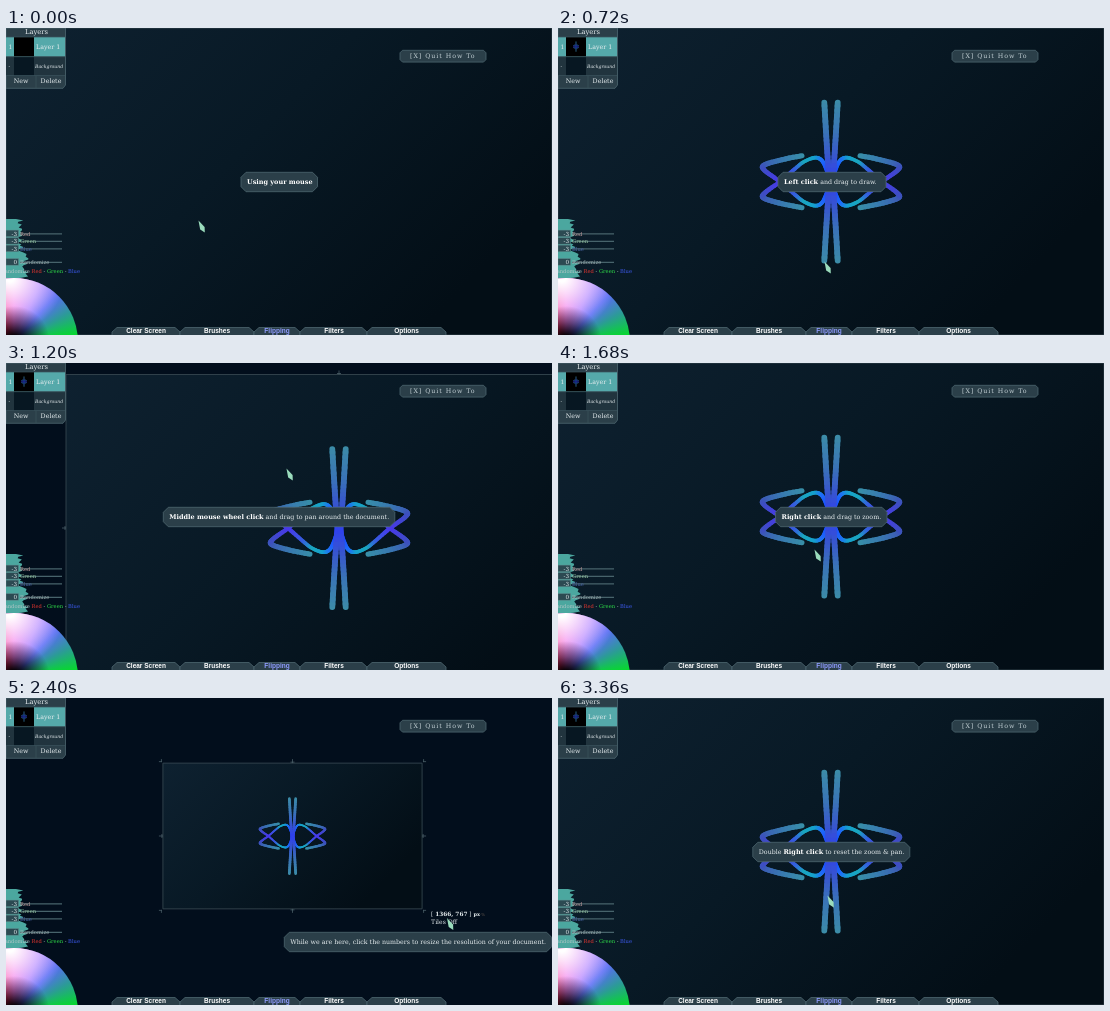
Recreate the animation shown at these times as an HTML page. Size 546 by 307 pixels, loop 3600 ms.

```html
<!DOCTYPE html>
<html lang="en">
<head>
<meta charset="utf-8">
<title>Using your mouse</title>
<style>
  html, body { margin: 0; width: 100%; height: 100%; overflow: hidden; background: #020e1b; }
  #stage { position: fixed; left: 0; top: 0; width: 546px; height: 307px; overflow: hidden; contain: strict; }
  svg { display: block; width: 546px; height: 307px; }
  text { font: 6.3px "DejaVu Serif", serif; fill: #e6edef; white-space: pre; }
  .bold { font-weight: bold; font-size: 6.5px; fill: #fff; }
  .tab { font: bold 6.5px "Liberation Sans", Arial, sans-serif; fill: #fff; }
  .mid { text-anchor: middle; }
  .box { fill: #2b3f49; stroke: #4d666f; stroke-width: .8; }
  .wheel {
    position: absolute; left: 0; top: 250px; width: 72px; height: 57px;
    clip-path: circle(64px at 8px 64px);
    background:
      radial-gradient(circle at 8px 64px, #000 6px, rgba(0,0,0,.5) 20px, rgba(0,0,0,0) 36px),
      radial-gradient(circle at 4px 0, #fff 4px, rgba(255,255,255,.6) 24px, rgba(255,255,255,0) 54px),
      conic-gradient(from 0deg at 8px 64px, #f060e8, #a870ff 24deg, #5a6cf5 42deg, #2c9a98 62deg, #06d92c 84deg, #06d92c 180deg, #ff1030 270deg, #ff2a70 335deg, #f060e8);
  }
</style>
</head>
<body>
<div id="stage">
<svg viewBox="0 0 546 307">
  <defs>
    <linearGradient id="paper" x1="0" y1="0" x2="1" y2=".55">
      <stop offset="0" stop-color="#0e2130"/>
      <stop offset=".5" stop-color="#081925"/>
      <stop offset="1" stop-color="#030e16"/>
    </linearGradient>
    <g id="loopStart"></g>
    <g id="loopEnd"></g>
    <g id="spine"></g>
  </defs>

  <rect width="546" height="307" fill="#020e1c"/>
  <g id="doc">
    <rect width="546" height="307" fill="url(#paper)"/>
    <g id="art" transform="translate(273 153.7)"></g>
  </g>
  <path id="frame" fill="none" stroke="#35464e" stroke-width=".9"/>
  <path id="marks" fill="none" stroke="#4b5f68" stroke-width=".8"/>
  <g id="info">
    <text x="9" y="7.2" style="font-size:5.8px">[ <tspan font-weight="bold">1366, 767</tspan> ] <tspan font-weight="bold" font-size="5">px</tspan><tspan font-size="4" fill="#66584f">·%</tspan></text>
    <text x="9" y="15" style="font-size:6.1px">Tiles Off</text>
  </g>

  <g id="layers">
    <path class="box" d="M0 0H59.5V57L57 60.3H0Z"/>
    <rect y="9" width="59" height="19.5" fill="#55a9aa"/>
    <rect y="29" width="59" height="18.5" fill="#21343e"/>
    <rect x="8" y="9" width="20" height="19.5" fill="#000"/>
    <rect x="8" y="29" width="20" height="18.5" fill="#071722"/>
    <path d="M0 9H59M0 28.7H59M0 47.5H59M30 48V60" stroke="#3b535d" stroke-width=".7"/>
    <g id="thumb" transform="translate(18 18.6) scale(.037 .062)" opacity=".6"></g>
    <text class="mid" x="30.5" y="6.4" style="font-size:6.8px">Layers</text>
    <text x="2.5" y="21" style="font-size:6px">1</text>
    <text x="30" y="21">Layer 1</text>
    <text x="2.5" y="40" style="font-size:5px">-</text>
    <text x="29" y="40" style="font-size:4.6px;font-style:italic">Background</text>
    <text class="mid" x="15" y="54.5">New</text>
    <text class="mid" x="45" y="54.5">Delete</text>
  </g>

  <path id="quit" class="box"/>
  <text x="404" y="30.4" letter-spacing=".95" style="fill:#c3d0d5">[X] Quit How To</text>

  <path id="rough" fill="#4ba79f"/>
  <g id="sliders"></g>
  <text x="74" y="245" text-anchor="end" style="font-size:5.2px;fill:#b3c6c6">Randomize <tspan fill="#e0352f">Red</tspan> - <tspan fill="#2fe04a">Green</tspan> - <tspan fill="#3f5cf5">Blue</tspan></text>

  <g id="tabs"></g>
  <g id="tip">
    <path class="box"/>
    <text></text>
    <text></text>
  </g>
  <path id="cursor" d="M-.5 -.5L5.6 6L5.8 11.5L1.2 8.4Z" fill="#9adcbc"/>
</svg>
<div class="wheel"></div>
</div>

<script>
const $ = id => document.getElementById(id);

function add(parent, tag, attrs, text = "") {
  const el = document.createElementNS("http://www.w3.org/2000/svg", tag);
  for (const key in attrs) el.setAttribute(key, attrs[key]);
  el.textContent = text;
  parent.append(el);
  return el;
}

function chamfer(x, y, w, h, c) {
  const r = x + w, b = y + h;
  return `M${x + c} ${y}H${r - c}L${r} ${y + c}V${b - c}L${r - c} ${b}H${x + c}L${x} ${b - c}V${y + c}Z`;
}

// Brush strokes: [x, y, width, red, green, blue], smoothed with Catmull-Rom.
const loop = [
  [-29, -26, 5, 56, 143, 168], [-49, -22, 5.2, 56, 122, 176], [-67, -16.5, 5.2, 60, 92, 182],
  [-66, -11, 4.8, 62, 76, 196], [-51, 0, 4.2, 72, 56, 236], [-36, 13, 3.8, 52, 96, 222],
  [-27, 20, 3.6, 26, 166, 190], [-16, 24, 3.8, 22, 160, 206], [-9, 21, 4, 30, 110, 248],
  [-4, 11, 4.4, 28, 78, 255], [-1, 0, 4.8, 34, 60, 255]
];
const spine = [
  [-6.7, -79, 5.8, 60, 140, 168], [-5, -50, 5.8, 58, 116, 182],
  [-3.4, -25, 5.8, 56, 86, 206], [-1.5, 0, 5.8, 46, 62, 242]
];

function sample(points, t) {
  const i = Math.min(Math.floor(t), points.length - 2), u = t - i;
  const at = k => points[Math.max(0, Math.min(points.length - 1, k))];
  const [p, a, b, n] = [at(i - 1), at(i), at(i + 1), at(i + 2)];
  return a.map((v, k) => k > 1 ? v + (b[k] - v) * u :
    v + .5 * u * (b[k] - p[k] + u * (2 * p[k] - 5 * v + 4 * b[k] - n[k] + u * (3 * (v - b[k]) + n[k] - p[k]))));
}

function brush(group, points, from, to) {
  const step = 1 / 6;
  for (let t = from; t < to - .01; t += step) {
    const [x, y, w, ...rgb] = sample(points, t), [x2, y2] = sample(points, t + step);
    add(group, "path", {
      d: `M${x} ${y}L${x2} ${y2}`, "stroke-width": w,
      stroke: `rgb(${rgb.map(Math.round)})`, "stroke-linecap": "round"
    });
  }
}

brush($("loopStart"), loop, 0, 4);
brush($("loopEnd"), loop, 4, 10);
brush($("spine"), spine, 0, 3);

function mirrored(parent) {
  return ["loopStart", "loopEnd", "spine"].map(id => {
    const group = add(parent, "g", {});
    for (const sx of [1, -1]) for (const sy of [1, -1])
      add(group, "use", { href: "#" + id, transform: `scale(${sx} ${sy})` });
    return group;
  });
}
const strokes = mirrored($("art"));
mirrored($("thumb"));

$("quit").setAttribute("d", chamfer(394, 22.3, 86, 11.8, 2.5));

// Ragged edge behind the colour sliders.
let seed = 7;
const random = () => (seed = seed * 16807 % 2147483647) / 2147483647;
let edge = "M0 191";
for (let y = 191; y <= 250; y += 1.4) edge += `L${(y < 226 ? 10 : 15) + random() * 8} ${y}`;
$("rough").setAttribute("d", edge + "L0 251Z");

[["-3", "Red", 205.5, "#c9a0a0"], ["-3", "Green", 213, "#9fd0a8"], ["-3", "Blue", 220.5, "#4a66a8"], ["0", "Randomize", 234, "#a9b9b9"]]
  .forEach(([value, label, y, fill]) => {
    const g = $("sliders");
    add(g, "rect", { x: 0, y: y - 3.4, width: 12.5, height: 6.6, fill: "#2c4a52", stroke: "#5d8a8c", "stroke-width": .5 });
    add(g, "path", { d: `M14 ${y + .3}H56`, stroke: "#47636b", "stroke-width": 1.2 });
    add(g, "text", { x: 11, y: y + 2, "text-anchor": "end", style: "font-size:5.6px" }, value);
    add(g, "text", { x: 14, y: y + 2, style: `font-size:5.2px;fill:${fill}` }, label);
  });

[["Clear Screen", 106, 174, 140], ["Brushes", 174, 248, 211], ["Flipping", 248, 294, 271], ["Filters", 294, 361, 328], ["Options", 361, 440, 400.5]]
  .forEach(([name, left, right, x]) => {
    add($("tabs"), "path", { class: "box", d: `M${left} 307.5V304L${left + 5} 299.5H${right - 5}L${right} 304V307.5Z` });
    const label = add($("tabs"), "text", { class: "tab mid", x, y: 305.4 }, name);
    if (name === "Flipping") label.style.fill = "#8f9cff";
  });

// Tips: [x, y, width, height, lines]; asterisks mark bold words.
const tips = {
  title: [235, 144.3, 76.5, 19.4, "*Using your mouse*"],
  left: [220, 144.3, 108, 19.4, "*Left click* and drag to draw."],
  middle: [157.3, 144.3, 231.5, 19.4, "*Middle mouse wheel click* and drag to pan around the document."],
  right: [217.5, 144.3, 111.5, 19.4, "*Right click* and drag to zoom."],
  size: [278.3, 234.3, 267.4, 19.4, "While we are here, click the numbers to resize the resolution of your document."],
  tile: [377.3, 234.3, 168.4, 27.6, "*Tile* will tile your document live while you edit.", "Great for designing patterns and tiles for games."],
  reset: [194.8, 144.3, 157, 19.4, "Double *Right click* to reset the zoom & pan."]
};

function showTip(name) {
  const [x, y, w, h, ...lines] = tips[name];
  const [box, ...rows] = $("tip").children;
  box.setAttribute("d", chamfer(x, y, w, h, 5));
  rows.forEach((row, i) => {
    row.textContent = "";
    row.setAttribute("x", x + 6);
    row.setAttribute("y", y + 12 + i * 8);
    (lines[i] || "").split("*").forEach((part, k) => add(row, "tspan", k % 2 ? { class: "bold" } : {}, part));
  });
}

function placeDoc(cx, cy, scale) {
  const w = 546 * scale, h = 307 * scale, x = cx - w / 2, y = cy - h / 2, r = x + w, b = y + h;
  $("doc").setAttribute("transform", `translate(${x} ${y}) scale(${scale})`);
  $("info").setAttribute("transform", `translate(${r} ${b})`);
  $("frame").setAttribute("d", `M${x} ${y}H${r}V${b}H${x}Z`);
  let d = "";
  for (const [px, sx] of [[x, -1], [r, 1]]) {
    for (const [py, sy] of [[y, -1], [b, 1]])
      d += `M${px + sx * 4} ${py + sy * 1.5}h${-sx * 3}M${px + sx * 1.5} ${py + sy * 4}v${-sy * 3}`;
    d += `M${px + sx * 4} ${cy}h${-sx * 4}M${px + sx} ${cy - 2}v4`;
  }
  for (const [py, sy] of [[y, -1], [b, 1]]) d += `M${cx} ${py + sy * 4}v${-sy * 4}M${cx - 2} ${py + sy}h4`;
  $("marks").setAttribute("d", d);
}

const home = [273, 153.5, 1], small = [286.5, 138, .4747];
// [tip, cursor x, cursor y, strokes drawn, document centre and scale]
const steps = [
  ["title", 193, 193, 0, home],
  ["left", 222, 154, 1, home],
  ["left", 273, 158, 2, home],
  ["left", 267, 234, 3, home],
  ["middle", 350, 121, 3, [402.5, 180.5, 1]],
  ["middle", 281, 106, 3, [333, 165, 1]],
  ["middle", 221, 95, 3, home],
  ["right", 257, 187, 3, home],
  ["right", 257, 205, 3, [280, 145.5, .73]],
  ["right", 300, 222, 3, small],
  ["size", 441.5, 220.5, 3, small],
  ["size", 446, 214, 3, small],
  ["tile", 503, 222, 3, small],
  ["reset", 290, 190, 3, home],
  ["reset", 270, 198, 3, home]
];

let current = -1;
function render() {
  const index = Math.floor(performance.now() / 240) % steps.length;
  if (index !== current) {
    current = index;
    const [tip, x, y, drawn, view] = steps[index];
    showTip(tip);
    placeDoc(...view);
    $("cursor").setAttribute("transform", `translate(${x} ${y})`);
    strokes.forEach((group, i) => group.style.display = i < drawn ? "" : "none");
    $("thumb").style.display = drawn > 2 ? "" : "none";
  }
  requestAnimationFrame(render);
}
render();
</script>
</body>
</html>
```
